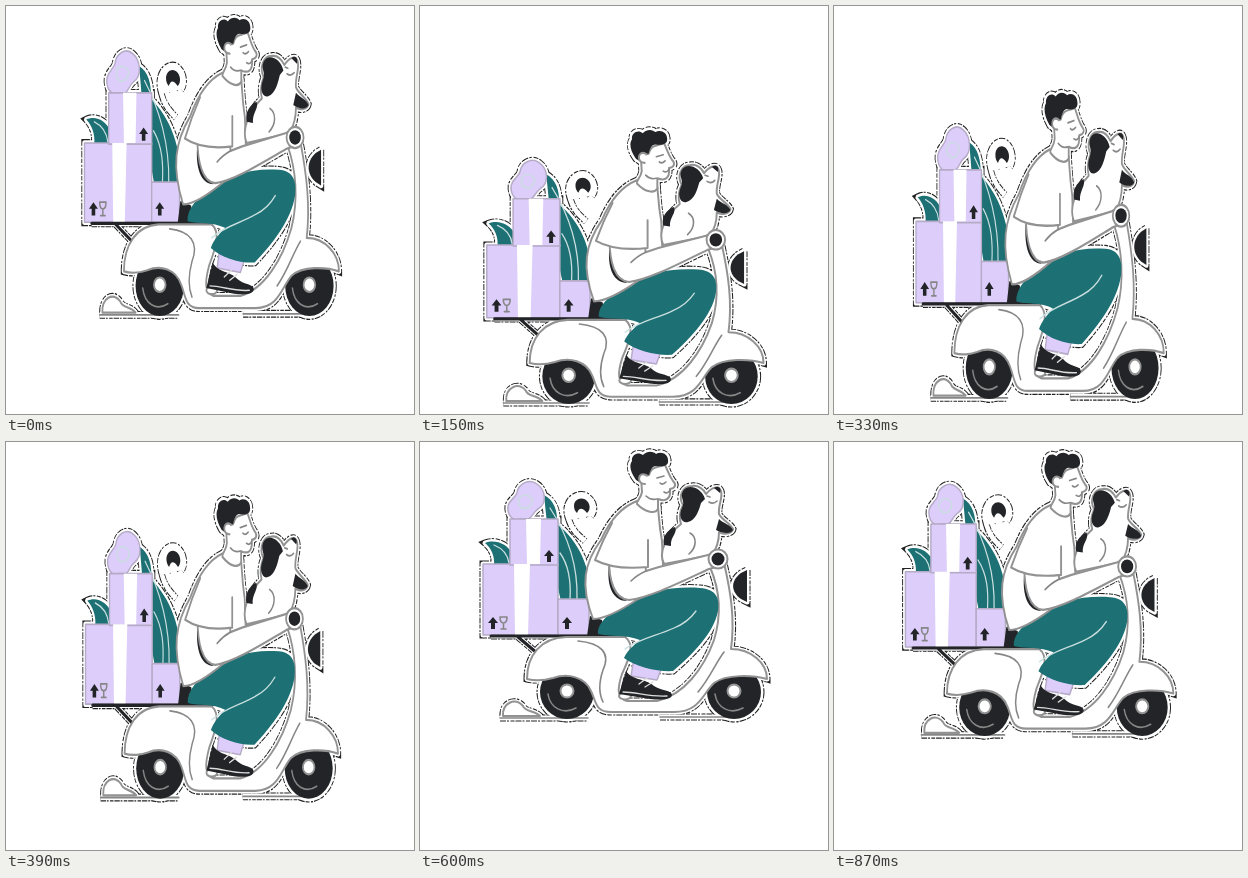
These frames come from a looping animation (408 px wide and 408 px high, 900 ms). An HTML page:

```html
<!DOCTYPE html>
<html lang="en">
<head>
<meta charset="utf-8">
<title>Scooter bounce</title>
<style>
  html, body { margin: 0; width: 100%; height: 100%; overflow: hidden; background: #fff; }
  svg { display: block; width: 100vw; height: 100vh; }
  .rim { fill: none; stroke: #222; stroke-width: 7; stroke-dasharray: 6 1 2 1.5 4 1; }
  .gap { fill: #fff; stroke: #fff; stroke-width: 5; stroke-linejoin: round; }
  .art { filter: blur(.45px); stroke-linecap: round; stroke-linejoin: round; }
  .ink { fill: #222427; }
  .teal { fill: #1d7074; }
  .lilac { fill: #dccdfa; }
  .white { fill: #fff; }
  .edge { stroke: #929292; stroke-width: 2; }
  .soft { stroke: #b5abc6; stroke-width: 1.5; }
  .line { fill: none; stroke: #868686; stroke-width: 1.6; }
  .vein { fill: none; stroke: #c9dfdf; stroke-width: 1.3; }
  .bar { fill: none; stroke: #222427; stroke-width: 3; }
  .lace { fill: none; stroke: #ddd; stroke-width: 1.3; }
</style>
</head>
<body>
<svg viewBox="0 0 408 408">
  <defs>
    <circle id="wheel" r="27"/>
    <path id="ground" d="M80 276H168M240 275H318"/>
    <path id="puff" d="M83 274C82 261 95 255 103 264C105 270 114 268 120 274Z"/>
    <path id="rack" d="M71 194H205M98 195L117 211"/>
    <g id="leaves">
      <path d="M124 53C134 58 138 69 137 82C158 99 173 126 169 160L142 164L130 110Z"/>
      <path d="M65 101C75 97 88 102 92 112V123H74C75 114 71 106 65 101Z"/>
    </g>
    <path id="vase" d="M100 77C92 80 87 72 88 64C90 57 95 56 97 51C98 42 109 36 117 42C126 48 127 62 118 67C113 70 112 76 108 77Z"/>
    <path id="bud" d="M154 64C154 57 162 54 167 59C171 63 170 69 167 71C162 65 159 66 157 71C155 69 154 67 154 64Z"/>
    <path id="stem" d="M149 78C142 61 154 50 165 53C176 59 175 70 171 74M149 78C152 88 158 93 165 99"/>
    <path id="hair" d="M216 38C210 30 209 23 212 19C211 13 218 9 223 13C228 8 234 10 236 12C241 9 248 12 248 18C249 24 243 25 236 24C232 24 230 29 229 33L223 32L221 41Z"/>
    <path id="head" d="M221 35L222 50C221 57 216 59 217 62C226 71 235 72 238 67L238 57C246 60 251 57 250 47C255 46 257 43 253 39C249 34 248 29 245 23C236 26 232 24 229 33Z"/>
    <path id="torso" d="M217 59C201 65 190 78 181 98C164 121 160 143 173 177C186 177 203 167 218 157L244 146L242 99C239 83 239 75 238 65C230 71 222 68 217 59Z"/>
    <path id="arm" d="M189 117C189 138 194 157 209 158C229 156 261 140 289 127L303 123C304 114 296 108 288 113L239 125L226 129L224 112Z"/>
    <path id="pants" d="M178 192C177 181 189 171 207 160C225 150 252 144 280 146C296 147 300 156 298 169C294 191 272 213 253 229C238 230 216 225 204 216C207 209 213 204 220 198C205 192 191 195 178 192Z"/>
    <path id="dog" d="M286 52C292 45 299 43 301 49C303 56 298 63 299 72C302 78 310 81 313 87C312 92 303 93 299 90C299 99 297 106 292 113L244 122C238 110 246 94 261 82C259 76 260 69 263 63C258 55 262 44 272 44C279 43 283 47 286 52Z"/>
    <path id="lamp" d="M327 128V160L321 157C311 150 310 139 321 131Z"/>
    <path id="body" d="M107 237C107 213 121 196 146 195H205C216 202 208 219 202 232C197 247 197 256 207 259H237C264 253 284 226 294 198C302 172 299 146 290 125L304 121C311 151 315 178 311 207C331 207 347 221 347 237C333 233 306 232 294 241C283 251 280 270 254 270H191C175 270 176 259 171 249C165 235 148 231 133 236C126 238 115 239 107 237Z"/>
    <g id="boxes">
      <rect x="63" y="122" width="75" height="71"/>
      <rect x="90" y="77" width="48" height="46"/>
      <rect x="138" y="157" width="31" height="36"/>
    </g>
    <path id="arrow" d="M0-6L5 0H2V6H-2V0H-5Z"/>
    <g id="silhouette">
      <use href="#ground"/><use href="#puff"/><use href="#rack"/>
      <use href="#leaves"/><use href="#vase"/><use href="#bud"/><use href="#stem"/>
      <use href="#boxes"/><use href="#hair"/><use href="#head"/><use href="#torso"/>
      <use href="#arm"/><use href="#pants"/><use href="#dog"/><use href="#lamp"/><use href="#body"/>
      <use href="#wheel" x="147" y="250"/><use href="#wheel" x="314" y="250"/>
    </g>
  </defs>

  <g id="rider">
    <use href="#silhouette" class="rim"/>
    <use href="#silhouette" class="gap"/>

    <g class="art">
      <!-- ground and exhaust -->
      <use href="#ground" class="line"/>
      <use href="#puff" class="white edge"/>

      <!-- plant and parcels -->
      <use href="#leaves" class="teal"/>
      <path class="vein" d="M130 66C147 92 158 124 157 157M140 111C150 125 151 141 150 157M74 103C84 107 88 114 89 121"/>
      <use href="#bud" class="ink"/>
      <use href="#vase" class="lilac soft"/>
      <path class="vein" stroke="#fff" d="M99 63C96 53 107 50 112 57C113 65 104 70 99 63Z"/>
      <use href="#boxes" class="lilac soft"/>
      <path class="white" d="M94 122H110L108 193H95ZM106 77H121L120 122H107Z"/>
      <g class="ink">
        <use href="#arrow" x="73" y="181"/><use href="#arrow" x="129" y="114"/><use href="#arrow" x="147" y="181"/>
      </g>
      <path class="line" d="M80 175H87C87 183 80 183 80 175ZM83.500 181V187M81 187H86"/>
      <use href="#rack" class="bar"/>

      <!-- scooter -->
      <g class="ink">
        <use href="#wheel" x="147" y="250"/><use href="#wheel" x="314" y="250"/>
        <path d="M167 194L170 174L182 178L184 194Z"/>
        <use href="#lamp"/>
      </g>
      <path class="line" d="M128 252C130 266 143 273 156 266M295 252C297 266 310 273 323 266"/>
      <g class="white edge">
        <circle cx="147" cy="249" r="6.500"/><circle cx="314" cy="249" r="6.500"/>
        <use href="#body"/>
      </g>
      <path class="line" d="M158 199C181 201 191 211 183 228C179 240 178 250 183 260M304 210C295 222 290 236 278 250"/>
      <ellipse class="white edge" cx="205" cy="254" rx="6" ry="3.500"/>

      <!-- legs -->
      <path class="lilac soft" d="M214 216L242 225L237 238L211 234Z"/>
      <path class="ink" d="M206 229C213 239 225 236 234 244C241 249 252 248 252 253C251 258 241 258 230 257L199 252Z"/>
      <path class="lace" d="M219 242L227 236M225 245L233 240M203 250C217 250 228 255 247 254"/>
      <use href="#pants" class="teal"/>
      <path class="vein" d="M205 207C220 196 237 194 254 186C264 182 271 176 276 169"/>

      <!-- torso and head -->
      <use href="#torso" class="white edge"/>
      <path class="ink" d="M189 122C190 140 196 152 207 159C194 159 186 146 189 122Z"/>
      <use href="#head" class="white edge"/>
      <use href="#hair" class="ink"/>
      <path class="white edge" d="M226 33C218 29 216 42 225 42"/>
      <path class="line" d="M237 36L244 34M240 41C242 43 244 42 246 40M244 50C247 52 249 50 250 48M226 54C229 57 233 58 237 57"/>

      <!-- dog -->
      <use href="#dog" class="white edge"/>
      <path class="ink" d="M285 57C282 46 268 41 263 49C259 56 266 58 262 66C258 74 262 82 268 80C276 78 279 68 281 61ZM244 103C242 95 247 88 255 85C258 91 250 95 251 104ZM299 77C304 82 310 82 313 88C311 92 303 92 296 88ZM294 46C298 43 302 46 300 51Z"/>
      <path class="line" d="M270 91C277 95 277 105 269 112M289 60C292 62 295 61 297 59M287 54L290 55"/>

      <!-- arm and handlebar -->
      <use href="#arm" class="white edge"/>
      <path class="white edge" d="M192 81C186 92 180 105 175 118C188 125 208 127 228 125L228 98"/>
      <path class="line" d="M226 129C217 133 214 136 211 139"/>
      <circle class="white edge" cx="298" cy="117" r="9.500"/>
      <circle class="ink" cx="298" cy="117" r="6.500"/>
    </g>
  </g>
</svg>
<script>
const LOOP = 900, STEP = 30, CENTER_X = 212, GROUND_Y = 277;

// time, ground height, vertical stretch
const keys = [
  [0, 310, 1.116], [60, 362, 1.15], [150, 398, 1.026], [210, 404, .883], [270, 403, 1],
  [330, 393, 1.146], [480, 294, 1.06], [570, 277, 1], [810, 277, 1], [870, 294, 1.06]
];
const rider = document.getElementById('rider');

function keyAt(i) {
  const n = keys.length, [time, ...pose] = keys[(i + n) % n];
  return [time + Math.floor(i / n) * LOOP, ...pose];
}

function rate(i, channel) {
  const a = keyAt(i), b = keyAt(i + 1);
  return (b[channel] - a[channel]) / (b[0] - a[0]);
}

function slope(i, channel) {
  const before = rate(i - 1, channel), after = rate(i, channel);
  return before * after > 0 ? 2 * before * after / (before + after) : 0;
}

// Monotone cubic interpolation around the loop
function sample(time, channel) {
  const i = keys.findLastIndex(key => key[0] <= time);
  const a = keyAt(i), b = keyAt(i + 1), span = b[0] - a[0];
  const u = (time - a[0]) / span, v = 1 - u;
  return v * v * (1 + 2 * u) * a[channel] + u * u * (1 + 2 * v) * b[channel]
    + span * u * v * (v * slope(i, channel) - u * slope(i + 1, channel));
}

function draw(now) {
  const time = Math.floor(now % LOOP / STEP) * STEP;
  const ground = sample(time, 1), stretch = sample(time, 2);
  rider.setAttribute('transform',
    `translate(${CENTER_X} ${ground}) scale(${1 / stretch} ${stretch}) translate(${-CENTER_X} ${-GROUND_Y})`);
}

function tick() {
  draw(performance.now());
  requestAnimationFrame(tick);
}
tick();
</script>
</body>
</html>
```
